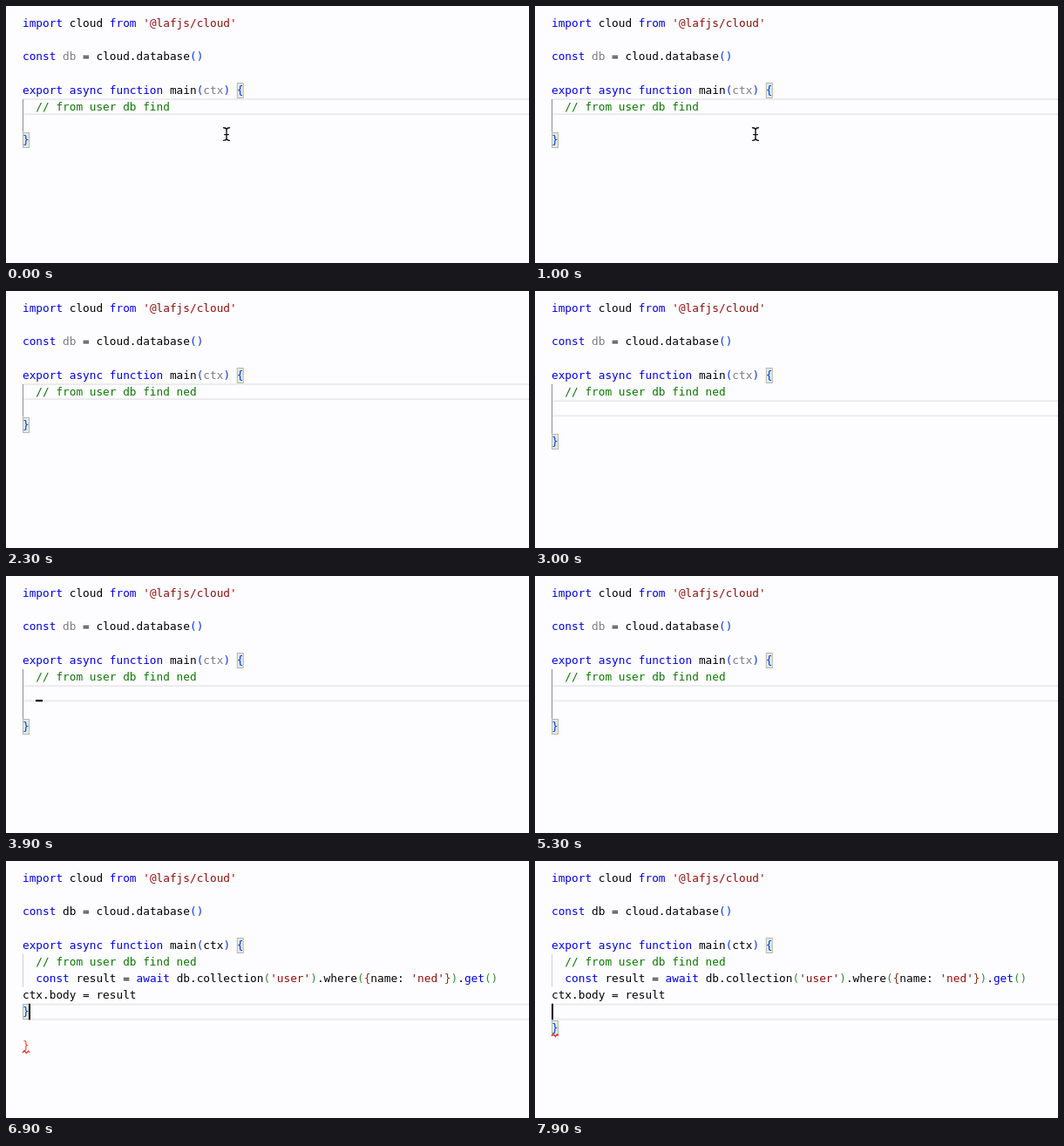
An HTML page that plays this animation: 600 px wide and 295 px high, repeating every 8 s.

```html
<!DOCTYPE html>
<html lang="en">
<head>
<meta charset="utf-8">
<title>Editor</title>
<style>
  html, body { margin: 0; width: 100%; height: 100%; overflow: hidden; background: #fdfcfe; }
  svg { display: block; }
  text { font: 12.76px "DejaVu Sans Mono", monospace; white-space: pre; fill: #000; }
  .k { fill: #0000e4; }
  .s { fill: #8c0f0c; }
  .c { fill: #0a7600; }
  .u { fill: #7c7c7e; }
  .b1 { fill: #0a35e8; }
  .b2 { fill: #31902f; }
  .b3 { fill: #7b3814; }
  .bad { fill: #f5403a; }
  .match { fill: #e2ecdf; stroke: #b4b8b4; }
  .wave { fill: none; stroke: #e02020; stroke-width: 1.2; }
</style>
</head>
<body>
<svg id="stage" width="600" height="295" viewBox="0 0 600 295"></svg>
<script>
const LOOP = 8000, LEFT = 19, CHAR = 7.68, LINE = 19.17;
const stage = document.getElementById('stage');

const colX = col => LEFT + col * CHAR;
const lineTop = row => 10.9 + row * LINE;
const baseY = row => 23.9 + row * LINE;
const rect = (x, y, w, h, attrs) =>
  `<rect x="${x}" y="${y}" width="${w}" height="${h}" ${attrs}/>`;

// Tokens are [text, class] pairs laid out on the character grid.
function codeLine(row, tokens) {
  let col = 0, out = '';
  for (const [text, cls = ''] of tokens) {
    out += `<text class="${cls}" x="${colX(col)}" y="${baseY(row)}">${text}</text>`;
    col += text.length;
  }
  return out;
}

const matchBox = (row, col) =>
  rect(colX(col) + .5, Math.round(lineTop(row)) + .5, 7, 17, 'class="match"');

const wave = row =>
  `<path class="wave" d="M19 ${baseY(row) + 4.5}l2-2.5 2.5 3 2-2.5 1.5 1.5"/>`;

function currentLine(row) {
  const y = lineTop(row);
  return rect(20, y - .5, 580, 1.7, 'fill="#e9e8ea"') +
         rect(20, y + 16.6, 580, 1.7, 'fill="#e9e8ea"');
}

function pointer() {
  const d = 'M249.5 139.8q3.5 0 3.5 2.6v9.4q0 2.6-3.5 2.6' +
            'M256.5 139.8q-3.5 0-3.5 2.6M253 151.8q0 2.6 3.5 2.6M250.6 147.6h4.8';
  return `<g fill="none" stroke-linecap="round"><path d="${d}" stroke="#fff" stroke-width="3"/>` +
         `<path d="${d}" stroke="#111" stroke-width="1.4"/></g>`;
}

// Caret visibility: from, to, row, column
const CARETS = [
  [300, 700, 5, 22], [700, 800, 5, 23],
  [1300, 1500, 5, 24], [1500, 1700, 5, 25], [1700, 2200, 5, 26],
  [2500, 3000, 6, 2],
  [5700, 6200, 8, 1], [6800, 7300, 8, 1], [7700, LOOP, 8, 0]
];
const inside = (t, a, b) => t >= a && t < b;

function scene(t) {
  const typed = 'ned'.slice(0, t < 1300 ? 0 : t < 1500 ? 1 : t < 1700 ? 2 : 3);
  const entered = t >= 2500, filled = t >= 5700;
  const checked = t >= 6500, erased = t >= 7700;
  const active = filled ? 8 : entered ? 6 : 5;
  const lastRow = t >= 7800 ? 9 : 10;
  const closeRow = erased ? lastRow : entered ? 8 : 7;
  const name = checked ? '' : 'u';

  let out = currentLine(active) + matchBox(4, 32) + matchBox(closeRow, 0);
  const guideEnd = lineTop(entered && !filled ? 8 : 7) - .5;
  out += rect(19, 107, 1, guideEnd - 107, `fill="${filled ? '#d0d0d2' : '#8e8e90'}"`);

  out += codeLine(0, [['import', 'k'], [' cloud '], ['from', 'k'], [' '], ["'@lafjs/cloud'", 's']]);
  out += codeLine(2, [['const', 'k'], [' '], ['db', name], [' = cloud.database'], ['()', 'b1']]);
  out += codeLine(4, [['export async function', 'k'], [' main'], ['(', 'b1'], ['ctx', name],
                      [')', 'b1'], [' '], ['{', 'b1']]);
  out += codeLine(5, [['  '], ['// from user db find ' + typed, 'c']]);

  if (filled) {
    out += codeLine(6, [['  '], ['const', 'k'], [' result = '], ['await', 'k'], [' db.collection'],
                        ['(', 'b2'], ["'user'", 's'], [')', 'b2'], ['.where'], ['(', 'b2'],
                        ['{', 'b3'], ['name: '], ["'ned'", 's'], ['}', 'b3'], [')', 'b2'],
                        ['.'], ['get', 'k'], ['()', 'b2']]);
    out += codeLine(7, [['ctx.body = result']]);
    if (!erased) out += codeLine(10, [['}', 'bad']]);
    if (checked) out += wave(lastRow);
  }
  out += codeLine(closeRow, [['}', 'b1']]);

  const caret = CARETS.find(([a, b]) => inside(t, a, b));
  if (caret) out += rect(colX(caret[3]) - (caret[3] === 0 ? 0 : .7), lineTop(caret[2]) - .5, 2, 18.5, '');
  if (inside(t, 3500, 4000) || inside(t, 4500, 5000)) out += rect(34, 142, 8, 2.2, '');
  if (t < 1300) out += pointer();
  return out;
}

let shown = '';
function draw(now) {
  const next = scene(now % LOOP);
  if (next !== shown) stage.innerHTML = shown = next;
  requestAnimationFrame(draw);
}
draw(0);
</script>
</body>
</html>
```
